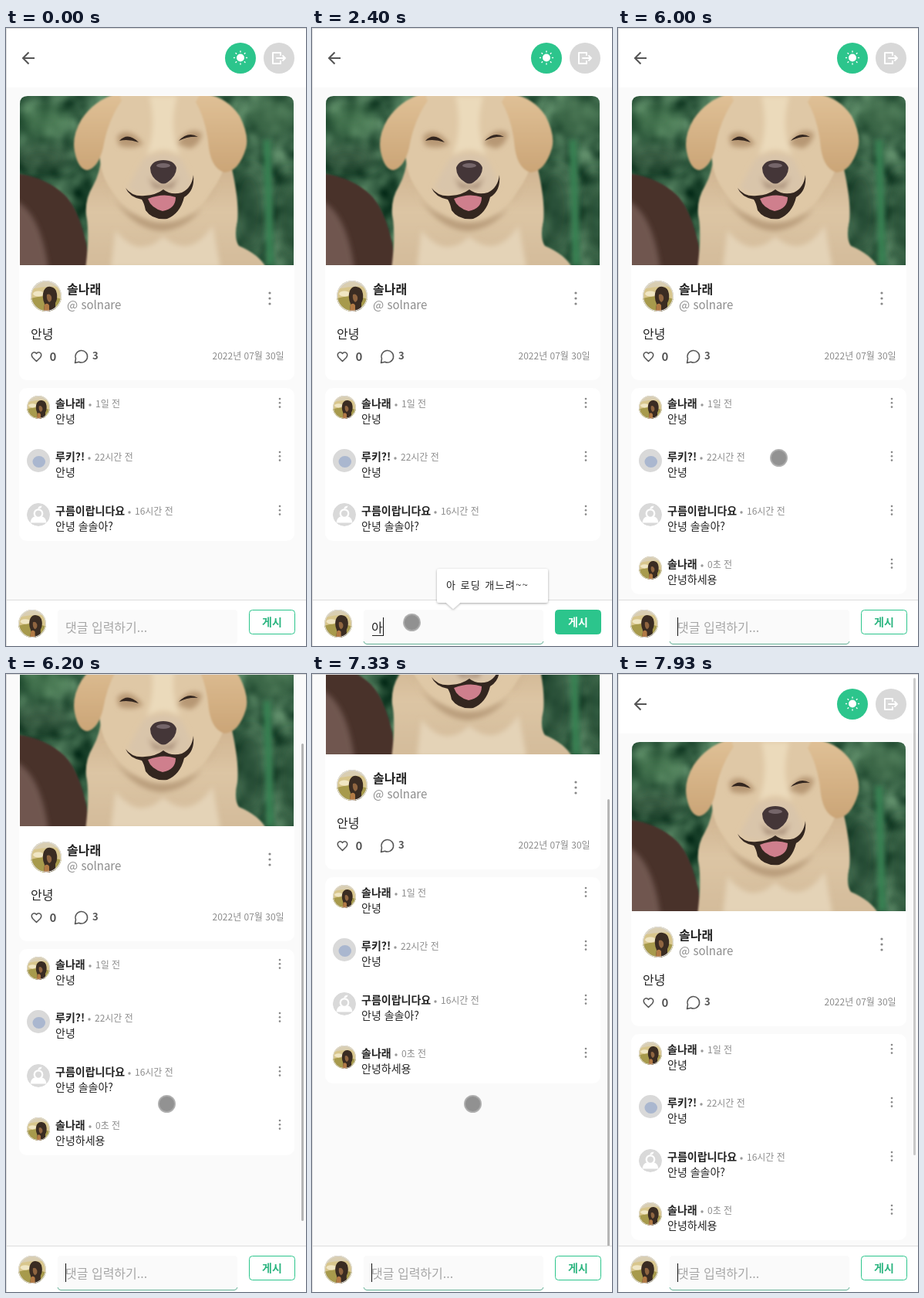
An HTML page that plays this animation: 389x800 px, repeating every 8 s.

```html
<!DOCTYPE html>
<html lang="ko">
<head>
<meta charset="utf-8">
<title>댓글</title>
<style>
html, body { margin: 0; width: 100%; height: 100%; overflow: hidden; background: #fafafa; }
svg { display: block; width: 389px; height: 800px; }
text { font: 14px "Noto Sans CJK KR", "Noto Sans KR", "Noto Sans CJK", "Noto Sans CJK JP", sans-serif; fill: #222; white-space: pre; }
.big { font-size: 16px; }
.b { font-weight: 700; }
.small { font-size: 12px; fill: #8c8c8c; }
.line { fill: none; stroke: #555; stroke-width: 1.5; stroke-linecap: round; stroke-linejoin: round; }
.hint { font-size: 13px; letter-spacing: 1.4px; }
</style>
</head>
<body>
<svg viewBox="0 0 389 800">
  <defs>
    <clipPath id="photoClip"><path d="M18 307V98Q18 88 28 88H363Q373 88 373 98V307Z"/></clipPath>
    <clipPath id="round"><circle r="20"/></clipPath>
    <filter id="blur" x="-40%" y="-40%" width="180%" height="180%"><feGaussianBlur stdDeviation="9"/></filter>
    <filter id="soft" x="-30%" y="-30%" width="160%" height="160%"><feGaussianBlur stdDeviation="3"/></filter>
    <filter id="edge"><feGaussianBlur stdDeviation=".8"/></filter>
    <filter id="leaves" x="0" y="0" width="100%" height="100%" color-interpolation-filters="sRGB">
      <feTurbulence type="fractalNoise" baseFrequency=".035" numOctaves="2" seed="4"/>
      <feColorMatrix values=".55 0 0 0 -.06  .6 0 0 0 .08  .5 0 0 0 .02  0 0 0 0 1"/>
    </filter>
    <filter id="shadow" x="-20%" y="-20%" width="140%" height="140%"><feDropShadow dx="0" dy="1" stdDeviation="1.5" flood-opacity=".35"/></filter>
    <linearGradient id="fur" x1="0" y1="0" x2="0" y2="1">
      <stop offset="0" stop-color="#cdb08c"/><stop offset=".5" stop-color="#dcc5a4"/><stop offset="1" stop-color="#d3bb9a"/>
    </linearGradient>
    <linearGradient id="ear" x1="0" y1="0" x2="0" y2="1">
      <stop offset="0" stop-color="#e0c197"/><stop offset="1" stop-color="#cba577"/>
    </linearGradient>
    <g id="pet" clip-path="url(#round)">
      <rect x="-20" y="-20" width="40" height="40" fill="#d8c68d"/>
      <path d="M-20 3Q0-3 20 4V20H-20Z" fill="#a79a4c"/>
      <path d="M-20-20H20V-12Q0-14-20-9Z" fill="#d9ceb2"/>
      <ellipse cx="-10" cy="-3" rx="7" ry="3.5" fill="#f0e6c4"/>
      <path d="M-3-7Q0-13 6-12Q13-11 14-3Q15 4 12 9L12 20H-3L-2 10Q-6 1-3-7Z" fill="#3a2c22"/>
      <path d="M1-2Q5-4 7 1Q8 6 4 8Q0 5 1-2Z" fill="#8f6540"/>
      <path d="M-2 11Q2 8 4 12V20H-3Z" fill="#b27a45"/>
      <circle r="19.4" fill="none" stroke="#ddd" stroke-width="1.2"/>
    </g>
    <g id="plain">
      <circle r="20" fill="#d9d9d9"/>
      <ellipse cx="1" cy="2" rx="11" ry="10" fill="#aab7cf"/>
    </g>
    <g id="guest" clip-path="url(#round)">
      <circle r="20" fill="#d9d9d9"/>
      <path d="M-14 14Q-13 5-6 3Q0 8 6 3Q13 5 14 14Z" fill="#fff"/>
      <circle cy="-2" r="7" fill="#d9d9d9" stroke="#fff" stroke-width="3"/>
      <path d="M-1-10Q0-16 6-15Q5-10-1-10Z" fill="#fff"/>
    </g>
  </defs>
  <rect width="389" height="800" fill="#fafafa"/>

  <g id="page">
    <rect width="389" height="77" fill="#fff"/>
    <path class="line" style="stroke-width:2;stroke-linecap:butt;stroke-linejoin:miter" d="M37 39H22M29.5 31.5L22 39L29.5 46.5"/>
    <circle cx="304" cy="39" r="20" fill="#2cc58c"/>
    <g transform="translate(304 38.5)" fill="#fff"><circle r="5"/><g id="rays"></g></g>
    <circle cx="354" cy="39" r="20" fill="#d8d8d8"/>
    <path class="line" style="stroke:#fff;stroke-width:2" d="M356 35V32H346V46H356V43M351 39H362M359 36L362 39L359 42"/>

    <rect x="17" y="87" width="357" height="369" rx="10" fill="#fff"/>
    <g clip-path="url(#photoClip)">
      <rect x="18" y="88" width="355" height="219" filter="url(#leaves)"/>
      <g filter="url(#blur)" opacity=".7">
        <ellipse cx="50" cy="120" rx="35" ry="22" fill="#4b7d54"/>
        <ellipse cx="45" cy="168" rx="40" ry="14" fill="#31513a"/>
        <ellipse cx="345" cy="115" rx="35" ry="25" fill="#4e7a56"/>
        <ellipse cx="315" cy="235" rx="24" ry="55" fill="#284b36"/>
        <ellipse cx="368" cy="245" rx="14" ry="60" fill="#2b5138"/>
      </g>
      <path d="M334 145H343L347 307H338Z" fill="#378253" filter="url(#soft)"/>
      <path d="M10 188Q50 192 76 216Q100 240 110 312H10Z" fill="#49302a" filter="url(#edge)"/>
      <path d="M10 222Q45 238 55 312H10Z" fill="#705650" filter="url(#soft)"/>

      <g filter="url(#edge)">
        <path d="M124 165Q122 188 113 204Q102 222 104 242Q109 266 103 312H338Q330 294 302 282Q295 272 300 250Q303 222 290 170Z" fill="url(#fur)"/>
        <path d="M150 84Q126 108 122 150Q118 185 138 212Q164 250 204 252Q246 246 266 212Q290 180 286 145Q280 106 256 84Z" fill="#dfc8a6"/>
        <path d="M146 84Q116 92 98 118Q85 140 89 160Q94 184 106 184Q120 180 126 155Q132 120 150 94Z" fill="url(#ear)"/>
        <path d="M252 84Q286 88 303 114Q316 140 311 156Q302 186 283 187Q267 182 263 156Q260 120 246 96Z" fill="url(#ear)"/>
      </g>
      <g filter="url(#soft)">
        <path d="M126 200Q160 262 204 263Q248 258 276 200Q262 234 240 242Q204 262 168 242Q140 230 126 200Z" fill="#b99d7b"/>
        <path d="M142 262Q172 300 204 270Q238 300 268 256L278 310H136Z" fill="#e4d3b7"/>
        <path d="M186 88Q196 130 182 165Q204 150 226 165Q210 130 222 88Z" fill="#ebdabb"/>
        <path d="M144 140Q160 126 178 150Q164 158 146 152ZM222 150Q236 126 254 136Q252 152 238 156Z" fill="#b79874"/>
        <path d="M180 168Q166 190 158 208Q180 222 204 210Q226 222 242 203Q236 185 226 168Q204 158 180 168Z" fill="#d9c5aa"/>
        <path d="M184 192Q204 214 224 192L216 208H192Z" fill="#a88e78"/>
      </g>
      <g fill="#33261f">
        <path d="M147 146Q158 134 172 148Q158 143 147 146ZM224 146Q236 133 249 141Q236 140 224 146Z"/>
        <path d="M155 207Q164 219 180 217Q195 216 204 209Q214 217 228 213Q241 207 243 190Q245 211 231 219Q226 240 209 247Q190 249 181 236Q179 226 176 222Q160 219 155 207Z"/>
      </g>
      <path d="M184 221Q204 213 220 219Q220 234 203 237Q188 233 184 221Z" fill="#cf7f8d"/>
      <path d="M187 181Q190 171 204 171Q218 171 221 181Q221 192 209 200Q204 203 199 200Q187 193 187 181Z" fill="#443638"/>
      <ellipse cx="204" cy="178" rx="9" ry="3" fill="#75666a"/>
    </g>

    <use href="#pet" transform="translate(52 347)"/>
    <text class="big b" x="79" y="344">솔나래</text>
    <text class="big" x="79" y="364" style="fill:#8c8c8c;font-size:15px">@ solnare</text>
    <text class="big" x="32" y="402">안녕</text>
    <path class="line" d="M39.5 431.5L34.5 426.5Q32 423 34.5 420.5Q37.5 418.5 39.5 421.5Q41.5 418.5 44.5 420.5Q47 423 44.5 426.5Z"/>
    <text class="b" x="56.5" y="431" style="fill:#555;font-size:15px">0</text>
    <path class="line" d="M89.5 433.5L90.5 428A7.8 7.8 0 1 1 94.5 432.3Z"/>
    <text class="b" x="112" y="429" style="fill:#555;font-size:13px">3</text>
    <text class="small" x="267.5" y="429">2022년 07월 30일</text>
    <g fill="#888"><circle cx="342" cy="343" r="1.6"/><circle cx="342" cy="350" r="1.6"/><circle cx="342" cy="357" r="1.6"/></g>

    <rect id="list" x="17" y="466" width="357" height="198" rx="10" fill="#fff"/>
    <g id="comments"></g>
  </g>

  <rect id="bar" x="383" width="3" height="618" rx="1.5" fill="#b5b5b5"/>
  <rect y="740" width="389" height="60" fill="#fff"/>
  <rect y="740" width="389" height="1" fill="#ddd"/>
  <use href="#pet" transform="translate(34 771) scale(.9)"/>
  <rect x="67" y="753" width="233" height="44" rx="4" fill="#fafafa"/>
  <path id="focus" d="M67 794Q68 797.5 71 797.5H296Q299 797.5 300 794" fill="none" stroke="#5fae93"/>
  <rect id="button" x="315.5" y="753.5" width="59" height="31" rx="4" stroke="#2cc58c"/>
  <text id="label" class="b" x="332" y="774">게시</text>
  <circle id="touch" r="10.5" fill="#777" fill-opacity=".8" stroke="#aaa" stroke-opacity=".9" stroke-width="2"/>
  <text id="entry" class="big" x="77" y="782"></text>
  <rect id="under" y="786" width="14" height="1" fill="#222"/>
  <rect id="caret" y="763" width="1" height="24" fill="#111"/>
  <g id="popup"></g>
  <path d="M0 .5H389M.5 0V800" stroke="#ddd"/>
</svg>
<script>
const $ = id => document.getElementById(id);
const set = (id, attrs) => { for (const k in attrs) $(id).setAttribute(k, attrs[k]); };
const show = (id, on) => set(id, { opacity: +on });

const FPS = 15, LOOP = 8000, ADVANCE = 14.72;

$('rays').innerHTML = [...Array(8).keys()]
  .map(i => `<rect x="6.8" y="-.7" width="2.4" height="1.4" rx=".7" transform="rotate(${i * 45})"/>`).join('');

// avatar, name, separator x, age, message
const comments = [
  ['pet', '솔나래', 109, '1일 전', '안녕'],
  ['plain', '루키?!', 108, '22시간 전', '안녕'],
  ['guest', '구름이랍니다요', 160, '16시간 전', '안녕 솔솔아?'],
  ['pet', '솔나래', 109, '0초 전', '안녕하세용']
];
$('comments').innerHTML = comments.map(([avatar, name, dot, age, message], i) => `
  <g id="comment${i}" transform="translate(0 ${Math.round(i * 69.33)})">
    <use href="#${avatar}" transform="translate(42 491) scale(.75)"/>
    <text class="b" x="64" y="491">${name}</text>
    <circle cx="${dot}" cy="488" r="1.7" fill="#999"/>
    <text class="small" x="${dot + 7}" y="491">${age}</text>
    <text x="64" y="511">${message}</text>
    ${[480, 485.3, 490.6].map(y => `<circle cx="355" cy="${y}" r="1.3" fill="#888"/>`).join('')}
  </g>`).join('');

// each entry: [first tick, value]; the latest one reached holds
const typing = [[0, ''], [33, 'ㅇ'], [35, '아'], [38, '안'], [42, '안ㄴ'], [44, '안녀'], [46, '안녕'],
  [49, '안녕ㅎ'], [52, '안녕하'], [55, '안녕핫'], [58, '안녕하세'], [60, '안녕하셍'], [62, '안녕하세요'],
  [65, '안녕하세용'], [77, '']];
const scrolling = [[0, 0], [92, 30], [93, 110], [94, 180], [95, 216], [110, 203], [111, 130], [112, 45], [113, 0]];
const caretOn = [[0, 0], [17, 1], [24, 0], [32, 1], [72, 0], [73, 1], [81, 0], [88, 1], [96, 0], [103, 1], [111, 0], [119, 1]];
const barAlpha = [[0, 0], [92, 1], [100, .75], [101, .5], [102, .25], [103, 0], [110, 1], [118, .85], [119, .7]];
const slow = '아 로딩 개느려~~';
const hints = [[0, null], [18, [169, ['오늘 날씨 최고예요', '귀여워요!', '반가워요', '안녕 솔솔아?', slow]]],
  [33, null], [35, [144, [slow]]], [38, [133, ['안녕 솔솔아?']]], [42, null]];
const at = (track, n) => track.findLast(([start]) => n >= start)[1];

function popupMarkup(hint) {
  if (!hint) return '';
  const [width, items] = hint, right = 162 + width, top = 700 - 44 * (items.length - 1);
  return `<path filter="url(#shadow)" fill="#fff" d="M165 ${top}H${right - 3}Q${right} ${top} ${right} ${top + 3}V741
    Q${right} 744 ${right - 3} 744H192L183 752L174 744H165Q162 744 162 741V${top + 3}Q162 ${top} 165 ${top}Z"/>` +
    items.map((s, i) => `<text class="hint" x="174" y="${top + 26 + i * 44}">${s}</text>`).join('');
}

let last = -1;
function draw() {
  const n = Math.floor((performance.now() % LOOP + 5) * FPS / 1000) % (LOOP * FPS / 1000);
  if (n !== last) {
    last = n;
    const text = at(typing, n), scroll = at(scrolling, n), posted = n >= 83;
    const end = 77 + Math.round(ADVANCE * text.length);

    set('page', { transform: `translate(0 ${-scroll})` });
    set('list', { height: posted ? 267 : 198 });
    show('comment3', posted);
    set('bar', { y: 5 + scroll * .773, opacity: at(barAlpha, n) });

    $('entry').textContent = text || '댓글 입력하기...';
    $('entry').style.fill = text ? '#222' : '#a6a6a6';
    set('under', { x: end - 14 });
    show('under', text && n < 72);
    set('caret', { x: end });
    show('caret', at(caretOn, n));
    show('focus', n >= 17);
    set('button', { fill: text ? '#2cc58c' : '#fff' });
    $('label').style.fill = text ? '#fff' : '#2cb580';

    const low = n < 77;
    set('touch', { cx: low ? 129.5 : 208.5, cy: low ? 769.5 : 556.5 });
    show('touch', n >= 11 && low || n >= 88 && n < 112);
    $('popup').innerHTML = popupMarkup(at(hints, n));
  }
  requestAnimationFrame(draw);
}
draw();
</script>
</body>
</html>
```
